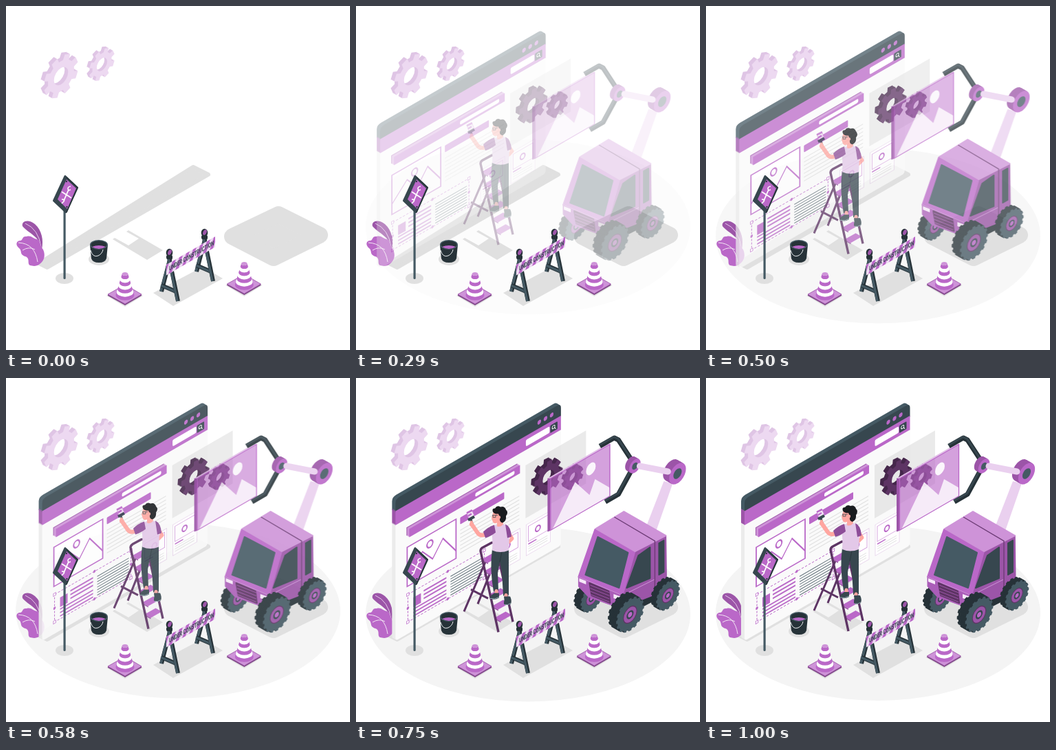
Write an HTML page that moves like this. It is 500 px wide and 500 px high and loops after 1040 ms.

```html
<!DOCTYPE html>
<html lang="en">
<head>
<meta charset="utf-8">
<title>Under construction</title>
<style>
html, body { margin: 0; width: 100%; height: 100%; overflow: hidden; background: #fff; }
svg { display: block; width: 100vw; height: 100vh; }
</style>
</head>
<body>
<svg id="stage" viewBox="0 0 500 500"></svg>
<script>
const purple = '#ba68c8', light = '#ce93d8', plum = '#9c55a8', deep = '#5d3464';
const slate = '#37474f', steel = '#455a64', ink = '#263238', shade = '#e0e0e0', skin = '#ffa6a0';

const poly = (points, fill, extra = '') => `<polygon points="${points}" fill="${fill}" ${extra}/>`;
const path = (d, fill, extra = '') => `<path d="${d}" fill="${fill}" ${extra}/>`;
const line = (d, color, w, extra = '') => path(d, 'none', `stroke="${color}" stroke-width="${w}" ${extra}`);
const oval = (x, y, rx, ry, fill, extra = '') => `<ellipse cx="${x}" cy="${y}" rx="${rx}" ry="${ry}" fill="${fill}" ${extra}/>`;
const rect = (x, y, w, h, fill, extra = '') => `<rect x="${x}" y="${y}" width="${w}" height="${h}" fill="${fill}" ${extra}/>`;
const group = (body, extra = '') => `<g ${extra}>${body}</g>`;
const move = (x, y, body) => group(body, `transform="translate(${x} ${y})"`);
// Upright isometric plane; x stays in screen pixels
const wall = (x, y, body) => group(body, `transform="translate(${x} ${y}) skewY(-30)"`);
const repeat = (n, fn) => Array.from({ length: n }, (_, i) => fn(i)).join('');
const rounded = (color, w) => `stroke="${color}" stroke-width="${w}" stroke-linejoin="round"`;

function gearShape(n, R, r, hole, turn = 22.5, taper = .08) {
  const step = 2 * Math.PI / n, points = [];
  for (let i = 0; i < n; i++) {
    const a = turn * Math.PI / 180 + i * step;
    for (const [f, q] of [[-.3, r], [-.3 + taper, R], [.3 - taper, R], [.3, r]])
      points.push([Math.sin(a + f * step) * q, -Math.cos(a + f * step) * q].map(v => v.toFixed(1)));
  }
  const ring = hole ? `M${hole} 0A${hole} ${hole} 0 1 0 ${-hole} 0A${hole} ${hole} 0 1 0 ${hole} 0` : '';
  return `M${points.join('L')}Z${ring}`;
}

function prism(x, y, d, depth, side, face) {
  return repeat(depth + 1, i => {
    const k = depth - i;
    return path(d, k ? side : face,
      `fill-rule="evenodd" transform="matrix(.866 -.5 0 1 ${x - k} ${y - k * .577})"`);
  });
}

const gear = (x, y, R, depth, side, face, turn) =>
  prism(x, y, gearShape(8, R, R * .76, R * .41, turn), depth, side, face);

function wheel(x, y, R, depth) {
  const disc = (r, fill) => `<circle r="${r}" fill="${fill}"/>`;
  return prism(x, y, gearShape(16, R, R * .91, 0, 0, .06), depth, ink, steel) +
    group(disc(R * .8, steel) + disc(R * .5, deep) + disc(R * .45, plum) + disc(R * .25, slate) + disc(R * .15, purple),
      `transform="matrix(.866 -.5 0 1 ${x} ${y})"`);
}

function shadows() {
  const soft = rounded(shade, 6), big = rounded(shade, 24);
  return poly('48,374 60,380 294,245 272,234', shade, soft) +
    poly('329,335 396,303 456,333 389,366', shade, big) +
    poly('155,339 158,337 178,348 193,338 175,328 178,326 228,355 205,369', shade) +
    poly('214,417 243,436 315,396 286,379', shade) +
    oval(85, 396, 13, 8, shade) + oval(135, 368, 15, 9, shade);
}

function plant() {
  return path('M52 354C49 334 33 331 24 320C22 313 32 309 42 317C52 326 55 340 52 354Z', plum) +
    line('M28 316Q47 324 51 350', '#e6c9ec', 1) +
    path('M35 377C30 374 36 367 28 364C19 361 24 356 19 352C13 347 15 341 21 341C25 340 23 334 30 335C37 333 39 338 45 339C51 342 49 349 54 354C58 363 55 371 49 375C44 379 39 378 35 377Z', purple) +
    line('M18 344Q42 345 46 372M24 355Q34 349 42 354', '#f3e5f5', 1);
}

function browser() {
  const W = 240.5;
  const shell = (top, bar, page) =>
    path(`M0 17V4Q0 -2 6 -2H${W - 6}Q${W} -2 ${W} 4V17Z`, top) + rect(0, 15.5, W, 21, bar) +
    path(`M0 36H${W}V199Q${W} 204 ${W - 4} 204H4Q0 204 0 200Z`, page);
  const handle = (x, y) => rect(x - 1.7, y - 2, 3.4, 4, '#fff', `stroke="${purple}" stroke-width=".8"`);
  const dot = (x, y) => oval(x, y, 1.8, 2, purple);
  const rows = (n, x, y, w, gap, color, size) => repeat(n, i => rect(x, y + i * gap, w, size, color));
  const card = x => rect(x, 145, 35, 45, '#fff', 'stroke="#e6d3ea" stroke-width=".8"') +
    rect(x + 3, 149, 29, 22, '#fff', `stroke="${light}" stroke-width=".8"`) +
    oval(x + 17, 160, 3.5, 4, 'none', `stroke="${purple}" stroke-width="1.8"`) +
    rect(x + 3, 174, 12, 1.6, purple) + rows(3, x + 3, 178, 28, 3.5, shade, 1);
  const content =
    repeat(3, i => oval(209 + i * 9, 6.8, 2.7, 3.1, purple)) +
    rect(189.5, 21.5, 34.5, 9.5, '#fff', 'rx="2"') + rect(225, 21, 10.5, 11, slate, 'rx="1"') +
    oval(229.7, 25.8, 2, 2.3, 'none', 'stroke="#fff" stroke-width="1"') + line('M231 27.5L233 30', '#fff', 1) +
    repeat(4, i => move(i - 4, (i - 4) * 1.154, rect(20, 53, 161, 12, i ? light : plum))) +
    rect(20, 53, 161, 12, purple) + rect(116, 56.5, 57, 5.5, '#fff', 'rx="2"') +
    rect(94, 79, 64, 10, purple, 'rx="1"') +
    rows(7, 94, 97, 86, 5.5, shade, 1.2) +
    rect(17, 78, 71, 57, '#fff', `stroke="${purple}" stroke-width="1.8"`) +
    oval(50, 92, 4.3, 5, 'none', `stroke="${purple}" stroke-width="2"`) +
    line('M17 120L39 97L54 116L69 95L88 124', purple, 1.6) +
    rect(18, 147, 111, 40, 'none', `stroke="${purple}" stroke-width="1" stroke-dasharray="3 2"`) +
    rect(26, 156, 11, 14, purple) + rows(3, 41, 154, 33, 5.5, purple, 2.2) + rows(3, 26, 172, 48, 5, purple, 2) +
    rows(8, 80, 156, 46, 3.9, '#607078', 1.1) +
    [18, 129].map(x => handle(x, 147) + handle(x, 187) + dot(x, 167)).join('') + dot(76, 147) + dot(76, 187) +
    card(190) + card(146);
  return repeat(5, i => wall(51 + i, 178 - (5 - i) * .577, shell(steel, plum, '#ebebeb'))) +
    wall(56, 178, shell(slate, purple, '#fafafa') + content) +
    wall(245, 127, rect(0, 0, 88, 77, '#dcdcdc', 'opacity=".6"')) +
    gear(278.5, 144.5, 24, 5, '#45274b', deep, 5) + gear(315, 144.5, 16.5, 4, '#45274b', deep);
}

function picture() {
  return poly('277,146 281,143.7 281,222 277,223.5', plum) + poly('277,146 364,95.5 368,96 281,146', '#e1bee7') +
    wall(281, 146,
      rect(0, 0, 87, 76, purple, 'opacity=".62"') +
      poly('3,76 36,26 57,57 65,38.5 87,64 87,76', '#faf3fb', 'opacity=".9"') +
      oval(59, 20, 7, 8.5, '#fff', 'opacity=".9"') +
      rect(.5, .5, 86, 75, 'none', `stroke="${purple}" stroke-width="1.3"`));
}

function truck() {
  const arm = (d, c, w) => line(d, c, w, 'stroke-linejoin="round"');
  const joint = (x, y, R, depth) => prism(x, y, gearShape(20, R, R, 0), depth, plum, purple) +
    group(`<circle r="${R * .5}" fill="${steel}"/>`, `transform="matrix(.866 -.5 0 1 ${x} ${y})"`);
  const claw = d => arm(d, ink, 7) + move(-.5, -1.5, arm(d, slate, 3));
  return picture() +
    poly('446,150 459,153 435,222 420,217', '#ead0ef') + joint(466, 139, 14, 9) +
    claw('M353 99L374 87L380 90L399 119') + claw('M361 180L380 169L398 136') +
    joint(404, 128, 9.5, 6) + line('M411 128L452 136', '#ead0ef', 9, 'stroke-linecap="round"') +
    wheel(341, 320.5, 18.5, 10) +
    poly('390,322 436,300 444,318 405,338', ink) +
    poly('404,252 449,229 450,308 386,333 386,314', plum, rounded(plum, 1.5)) +
    poly('346,220 404,252 386,316 322,289', purple, rounded(purple, 2)) +
    poly('322,289 386,316 386,332 372,331 336,318 322,303', '#aa5db8', rounded('#aa5db8', 1)) +
    poly('347,219 388,194 449,229 404,252', light, rounded(light, 2)) +
    line('M374 202L433 237V316', '#6d3c76', 1.4) +
    poly('350,231 394,254 381,305 332,286', steel, rounded(steel, 2)) +
    poly('409,258 426,246 426,291 392,305', slate, rounded(slate, 2)) +
    poly('439,240 446,236 446,282 439,286', slate, rounded(slate, 2)) +
    line('M322 289L386 316L432 293', light, 1) +
    poly('338,298 366,310 368,327 341,316', deep, rounded(deep, 2)) +
    repeat(4, i => line(`M339 ${301 + i * 4.5}L367 ${312 + i * 4.5}`, plum, 1)) +
    poly('323,291 333,295 333,300 323,296', '#f6e9f8') + poly('373,314 384,318 384,324 373,320', '#f6e9f8') +
    wheel(452, 316, 20, 8) + wheel(397, 344, 23.5, 12);
}

function painter() {
  const rail = (d, w = 3) => line(d, deep, w, 'stroke-linejoin="round"');
  const limb = (d, w) => line(d, skin, w, 'stroke-linecap="round" stroke-linejoin="round"');
  const ladder = rail('M157 338L188 266M177 327L202 264M167 306L192 319') +
    repeat(6, i => {
      const x = 183 + i * 3.7, y = 262 + i * 17;
      return poly(`${x},${y} ${x + 16},${y - 9} ${x + 25},${y - 4} ${x + 9},${y + 5}`, purple) +
        poly(`${x},${y} ${x + 9},${y + 5} ${x + 9},${y + 7} ${x},${y + 2}`, plum);
    }) +
    rail('M207 368L181 250Q181 247 184 245L197 238Q202 237 203 241L228 353', 3.4);
  const legs = path('M198 247Q210 252 222 247L222 277L222 314L214 315L212 280L209 266L206 282L207 308L200 309Q194 276 198 247Z', slate) +
    line('M209 266L212 251', ink, .8) + limb('M204 308V312M218 314V318', 5) +
    path('M195 317Q197 313 201 311L208 311L208 318Q201 322 195 319Z', slate) +
    path('M215 325Q216 320 215 316L224 316Q227 322 225 327Q218 330 215 327Z', slate) +
    line('M195 319Q202 321 208 317M216 328Q221 329 225 326', '#90a4ae', 1);
  const brush = path('M161 194L168 190L172 199L164 203Z', '#f3e5f5', `stroke="${light}" stroke-width=".8"`) +
    line('M161 195L169 191M163 199L168 196', purple, 2.4) +
    line('M163 205L172 200', slate, 4) + line('M167 204L170 213', slate, 3);
  const body = limb('M224 227L227 232L222 237', 5) + limb('M188 226Q181 229 177 224L168 211', 6) + limb('M167 212L168 208', 4) +
    path('M199 214Q210 208 220 213Q224 222 222 249Q210 254 198 249Q199 232 197 222Z', '#e3c8e8') +
    path('M201 212Q192 215 185 222L188 231Q197 228 203 223Z', '#8d4d98') +
    path('M217 211Q225 214 226 229L220 231Z', '#8d4d98');
  const head = path('M200 191L197 202L199 208Q201 211 205 209L205 214Q210 216 214 211L213 199L207 191Z', skin) +
    path('M199 193Q197 188 202 188Q205 183 210 186Q216 184 218 190Q222 194 218 199Q219 206 213 209Q208 208 209 202L207 196Q202 197 199 193Z', '#191c1f') +
    oval(208.5, 201, 1.6, 2.2, skin) + line('M198 198H206M199 198V201H203V198', slate, .8);
  return ladder + legs + brush + body + head;
}

function sign() {
  return rect(83.5, 290, 3.2, 107, steel, 'rx="1.5"') +
    poly('86,247.5 103.5,264 87,299.5 69.5,283', slate, rounded(slate, 3)) +
    line('M88 249L104 264L88 300', ink, 1.5) +
    poly('88,252 102,265 89,295 75,281', purple) +
    line('M81 270L95 279', '#fff', 2) + line('M91 267L84 283', '#fff', 1.8) +
    line('M94 262Q88 263 91 268L94 267M81 281Q86 281 84 284L81 287', '#fff', 1.6) +
    oval(88, 255, 1, 1.2, ink) + oval(88.5, 292, 1, 1.2, ink);
}

function bucket() {
  return path('M122 347L124 367Q126 373 135 373Q144 373 146 367L148 347Z', ink) +
    oval(135, 347, 13, 7, steel) + oval(135, 347, 11.5, 5.7, ink) +
    path('M125 350Q135 346 145 350Q135 356 125 350Z', purple) +
    line('M123 355Q126 366 134 363Q140 360 141 354', '#eceff1', 1);
}

function cone() {
  const count = 7;
  const level = i => [420 - 30.5 * i / count, 13.5 - 9.2 * i / count];
  const bands = repeat(count, i => {
    const [y, r] = level(i), [y2, r2] = level(i + 1);
    return path(`M${173 - r} ${y}A${r} ${r * .577} 0 0 0 ${173 + r} ${y}L${173 + r2} ${y2}A${r2} ${r2 * .577} 0 0 1 ${173 - r2} ${y2}Z`,
      i % 2 ? '#fff' : purple);
  });
  return poly('146,421 173,406 199,421 173,437', shade) +
    poly('148,419 173,433 197,419 197,421 173,435 148,421', '#7d4486') +
    poly('148,419 173,405 197,419 173,433', light, `stroke="${plum}" stroke-width=".8"`) +
    bands + oval(173, 389.5, 4.3, 2.5, light);
}

function barrier() {
  const leg = d => line(d, ink, 6) + move(-1, 0, line(d, steel, 3.5));
  const trestle = leg('M239 365L226 415') + leg('M226 406L247 415') + leg('M237 366L250 429') +
    rect(233, 362, 9, 6, ink, 'rx="2"') + oval(237.5, 358.5, 4.8, 5.8, ink) +
    oval(238, 358, 2.6, 4, plum, 'transform="rotate(25 238 358)"');
  const stripes = repeat(8, i => poly(`${i * 10 - 7},15.5 ${i * 10 - 2},15.5 ${i * 10 + 4},0 ${i * 10 - 1},0`, purple));
  return trestle + move(51, -29, trestle) +
    wall(233, 376, `<clipPath id="board"><rect width="71" height="15.5"/></clipPath>` +
      rect(0, 0, 71, 15.5, '#edd9f1') + group(stripes, 'clip-path="url(#board)"')) +
    `<text transform="matrix(.62 -.358 0 1 237 385)" font-family="Roboto, 'Open Sans', sans-serif" font-weight="700" font-size="9.6" fill="${slate}">UNDER CONSTRUCTION</text>`;
}

const stage = document.getElementById('stage');
const mover = (axis, body) => group(body, `data-axis="${axis}"`);
stage.innerHTML =
  mover('y', oval(250, 342, 236, 127, '#f4f4f4')) + shadows() +
  gear(80, 102, 29, 5, '#dfc5e5', '#edd9f1') + gear(139.5, 85, 21.5, 4, '#dfc5e5', '#edd9f1') +
  plant() + mover('x', browser()) + mover('x', truck()) + mover('y', painter()) +
  sign() + bucket() + cone() + move(173.3, -15, cone()) + barrier();

const movers = [...stage.querySelectorAll('[data-axis]')];
const bezier = (s, a, b) => 3 * (1 - s) ** 2 * s * a + 3 * (1 - s) * s * s * b + s ** 3;

// Ease with a slight overshoot: cubic-bezier(.36, -.01, .5, 1.38)
function ease(x) {
  let lo = 0, hi = 1;
  for (let i = 0; i < 30; i++) {
    const mid = (lo + hi) / 2;
    if (bezier(mid, .36, .5) < x) lo = mid; else hi = mid;
  }
  return bezier(lo, -.01, 1.38);
}

function draw() {
  const time = performance.now() % 1040;
  const tick = Math.floor(time * .024 + .1); // 24 steps per second
  const p = time < 130 ? 0 : ease(Math.min(1, tick / 24));
  const shift = 30 * (p - 1);
  for (const el of movers) {
    el.setAttribute('opacity', Math.max(0, Math.min(1, p)));
    el.setAttribute('transform', el.dataset.axis === 'x' ? `translate(${shift} 0)` : `translate(0 ${shift})`);
  }
  requestAnimationFrame(draw);
}
draw();
</script>
</body>
</html>
```
